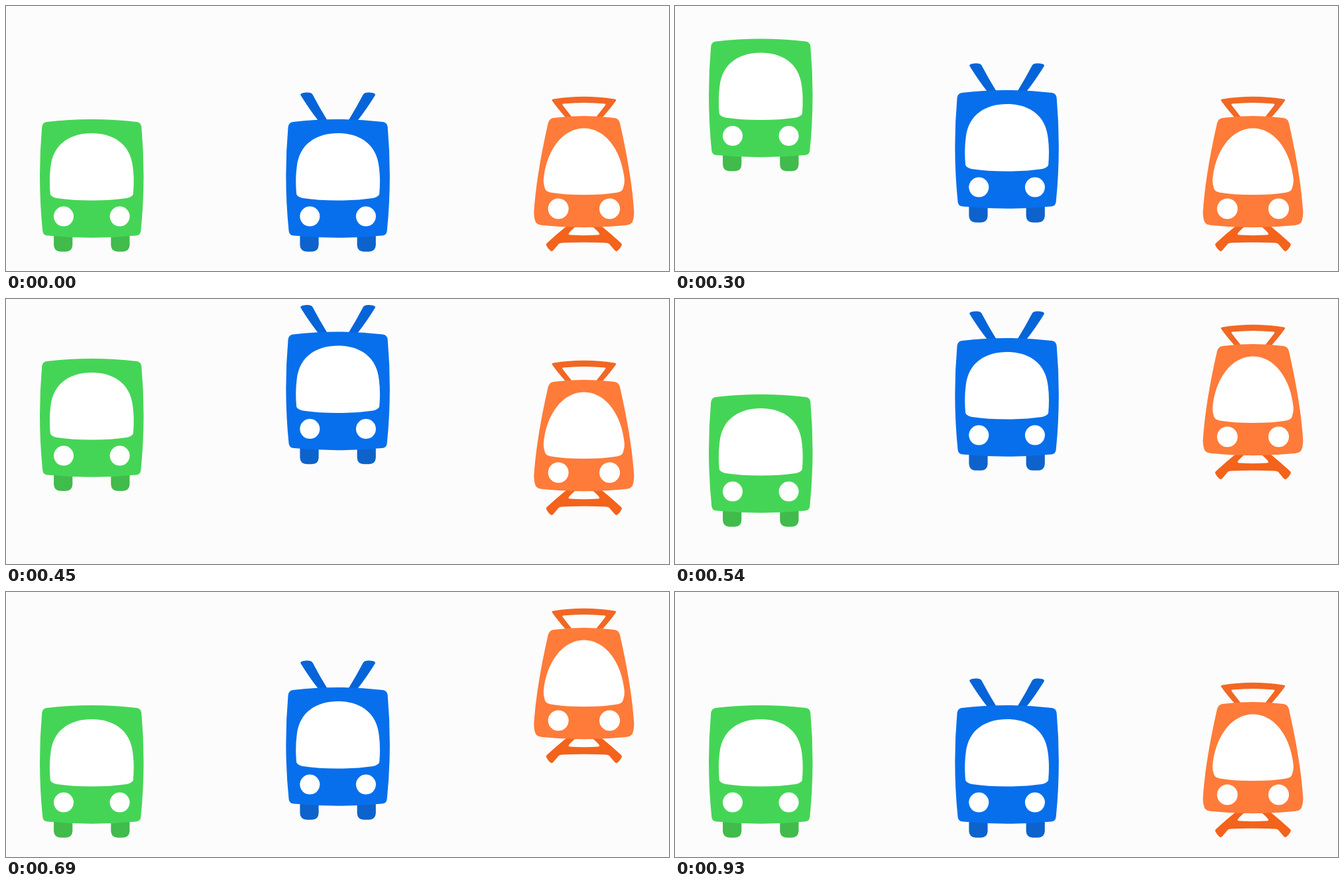
An HTML page for the animation above (1.08 s loop, 1000 by 400 pixels).

```html
<!DOCTYPE html>
<html lang="en">
<head>
<meta charset="utf-8">
<title>Bouncing transport</title>
<style>
  html, body { margin: 0; width: 100%; height: 100%; overflow: hidden; background: #fcfcfc; }
  svg { display: block; width: 1000px; height: 400px; }
  .glass { fill: #fff; }
</style>
</head>
<body>
<svg viewBox="0 0 1000 400">
  <defs>
    <!-- All shapes are centred on x = 0 -->
    <path id="wheel" d="M-57.2 344V361Q-56.5 370.7 -47 370.7H-39Q-29.5 370.7 -29 361V344Z"/>
    <path id="pole" d="M-56.3 134.5Q-57.5 131 -47 130.5Q-40 130.3 -38.2 133.5Q-28 153 -16 172.500H-30Q-43 156 -56.300 134.500Z"/>
    <path id="cabin" d="M-68 175Q0 167 68 175Q74 176 75 182Q82 262 74 340Q73 346 67 346.500Q0 353 -67 346.500Q-73 346 -74 340Q-82 262 -75 182Q-74 176 -68 175Z"/>
    <g id="front" class="glass">
      <path d="M0 192C30 192 58 206 62 243Q64.500 262 62.500 284Q61 288 53 290Q29 293.500 0 293.500Q-29 293.500 -53 290Q-61 288 -62.500 284Q-64.500 262 -62 243C-58 206 -30 192 0 192Z"/>
      <circle cx="-42.300" cy="317.600" r="15"/>
      <circle cx="42.300" cy="317.600" r="15"/>
    </g>
  </defs>

  <g class="car" data-x="129.3">
    <g fill="#41bb4c">
      <use href="#wheel"/>
      <use href="#wheel" transform="scale(-1 1)"/>
    </g>
    <use href="#cabin" fill="#45d556"/>
    <use href="#front"/>
  </g>

  <g class="car" data-x="500.6">
    <g fill="#0d63cb">
      <use href="#wheel"/>
      <use href="#wheel" transform="scale(-1 1)"/>
    </g>
    <g fill="#0564d8">
      <use href="#pole"/>
      <use href="#pole" transform="scale(-1 1)"/>
    </g>
    <use href="#cabin" fill="#076fec"/>
    <use href="#front"/>
  </g>

  <g class="car" data-x="871.8">
    <path fill="#f26724" d="M-48 143Q-49.500 141 -46 140.500Q0 133 46 140.500Q49.500 141 48 143Q42 152 28 168H18L32 150Q33.500 147.500 31 147.500Q0 144.500 -31 147.500Q-33.500 147.500 -32 150L-18 168H-28Q-42 152 -48 143Z"/>
    <path fill="#f3631b" fill-rule="evenodd" d="M-26 332Q-42 345 -56 358Q-58 360 -56.500 362Q-54 367 -50.500 369.500Q-48.500 371 -46.500 369L-38 359Q-36.500 357.500 -33 357.500Q0 356 33 357.500Q36.500 357.500 38 359L46.500 369Q48.500 371 50.500 369.500Q54 367 56.500 362Q58 360 56 358Q42 345 26 332ZM-14 334Q-20 339 -23 343Q-24 345.500 -21 345.500Q0 347 21 345.500Q24 345.500 23 343Q20 339 14 334Z"/>
    <path fill="#ff7b39" d="M-46 169Q0 163 46 169Q52 170 54 176Q72 255 75.500 311Q75.500 320 73 326Q71 330 63 331Q0 337.500 -63 331Q-71 330 -73 326Q-75.500 320 -75.500 311Q-72 255 -54 176Q-52 170 -46 169Z"/>
    <g class="glass">
      <path d="M0 184.500C32 184.500 57 218 61 262Q61.500 268 59 275Q58 280 50 281.500Q30 285 0 285Q-30 285 -50 281.500Q-58 280 -59 275Q-61.500 268 -61 262C-57 218 -32 184.500 0 184.500Z"/>
      <circle cx="-38.700" cy="306" r="15.500"/>
      <circle cx="38.700" cy="306" r="15.500"/>
    </g>
  </g>
</svg>
<script>
  const LOOP = 1080, STEP = 30, START = 30, STAGGER = 150, RISE = 300, HEIGHT = 125;
  const cars = [...document.querySelectorAll('.car')];
  const begin = performance.now();

  // Smooth rise for RISE ms, then the same curve back down
  function lift(t) {
    const p = Math.max(0, 1 - Math.abs(t - RISE) / RISE);
    return HEIGHT * p * p * (3 - 2 * p);
  }

  function draw() {
    const elapsed = Math.max(0, performance.now() - begin) % LOOP;
    const t = Math.floor(elapsed / STEP) * STEP;
    cars.forEach((car, i) => {
      const y = -lift(t - START - i * STAGGER);
      car.setAttribute('transform', `translate(${car.dataset.x} ${y})`);
    });
    requestAnimationFrame(draw);
  }
  draw();
</script>
</body>
</html>
```
